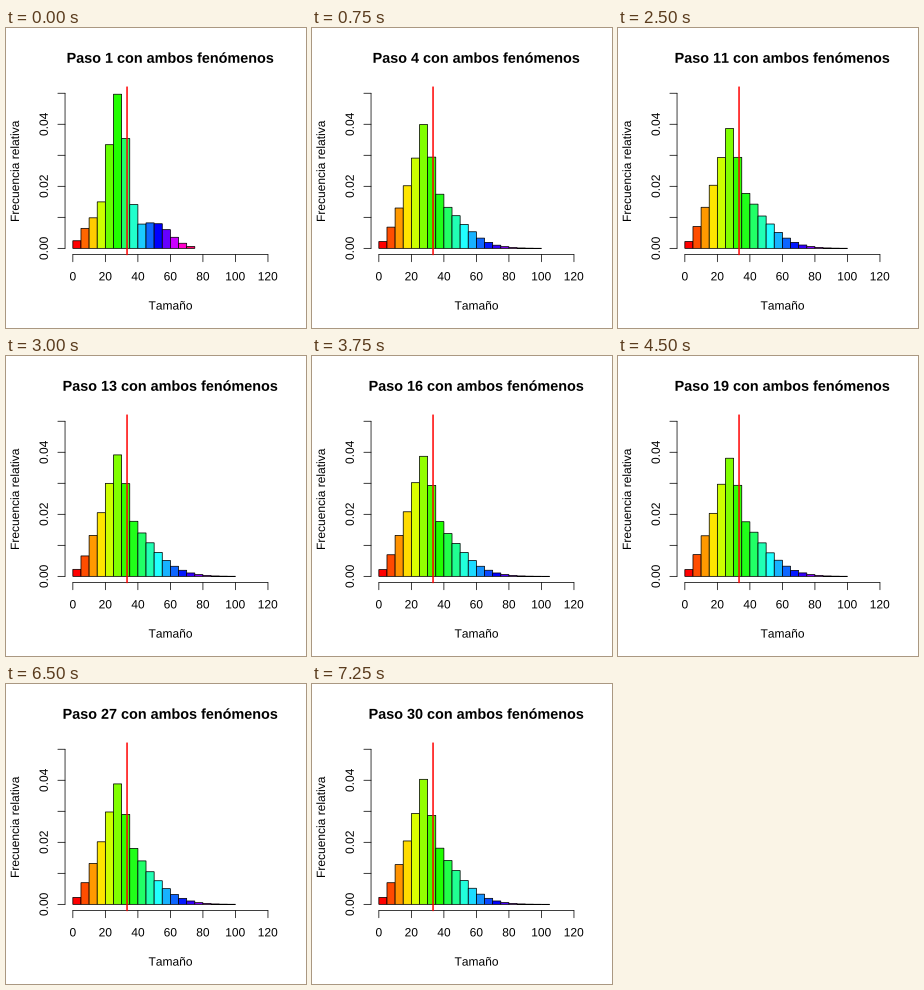
A matplotlib script that plays this animation: 300x300 px, repeating every 7500 ms.

```python
import colorsys

import matplotlib.pyplot as plt
import numpy as np
from matplotlib.animation import FuncAnimation
from matplotlib.patches import PathPatch, Rectangle
from matplotlib.textpath import TextPath
from matplotlib.transforms import Affine2D

plt.rcParams["text.kerning_factor"] = 6  # plain advances, no kerning

STEPS = 30
MAX_BINS = 21
PT = 0.72  # points per pixel at 100 dpi
LEFT, RIGHT, TOP, BOTTOM = 59.04, 269.76, 59.04, 226.56
MID_X, MID_Y = (LEFT + RIGHT) / 2, (TOP + BOTTOM) / 2
X_UNIT = (RIGHT - LEFT) / 1.08 / 120
Y_UNIT = (BOTTOM - TOP) / 1.08 / 0.05
X0 = LEFT + 4.8 * X_UNIT
Y0 = BOTTOM - 0.002 * Y_UNIT


def bump(i, height, centre, spread):
    return height * np.exp(-((i - centre) / spread) ** 2 / 2)


def start_shape(i):
    """Sharp main peak with a shoulder on either side."""
    return (bump(i, 0.0485, 5.05, 1.1) + bump(i, 0.0088, 2, 1.25)
            + bump(i, 0.0083, 9.4, 2))


def stable_shape(i):
    """Quadratic rise that switches over to a Gaussian fall."""
    rise = 0.0022 + 0.004 * i + 0.0007 * i**2
    j = i - 7
    fall = 0.0174 * np.exp(-0.18 * j - 0.031 * j**2)
    return fall + (rise - fall) / (1 + np.exp(4 * (i - 5.77)))


def histogram(step):
    mix = 1 - np.exp(-0.8 * (step - 1))
    drift = 0.7 * np.cos(np.pi * (step - 16) / 7)
    i = np.arange(round(15 + mix * (5 + drift)))
    noise = np.random.default_rng(step).normal(0, 0.015, MAX_BINS)
    heights = start_shape(i) * (1 - mix) + stable_shape(i) * mix
    return heights * (1 + mix * noise[:len(i)])


def rainbow(fraction):
    """Hue wheel whose greens carry a little red."""
    r, g, b = colorsys.hsv_to_rgb(fraction, 1, 1)
    return max(r, 0.13 * g), g, b


fig = plt.figure(figsize=(3, 3), dpi=100, facecolor="white")
ax = fig.add_axes([0, 0, 1, 1])
ax.set_xlim(0, 300)
ax.set_ylim(300, 0)
ax.axis("off")


def line(xs, ys, color="black", width=0.75):
    ax.plot(xs, ys, color=color, lw=width * PT, snap=False, zorder=3,
            solid_capstyle="round")


def text_path(x, y, text, size=12, weight="normal", upward=False):
    """Outline of a text centred on x, y along its baseline."""
    path = TextPath((0, 0), text, size=size,
                    prop={"family": "Liberation Sans", "weight": weight})
    box = path.get_extents()
    move = Affine2D().translate(-(box.x0 + box.x1) / 2, 0).scale(1, -1)
    if upward:
        move.rotate_deg(-90)
    return move.translate(x, y).transform_path(path)


def label(*args, **style):
    return ax.add_patch(PathPatch(text_path(*args, **style), fc="black",
                                  lw=0, snap=False, zorder=4))


bars = [ax.add_patch(Rectangle((X0 + 5 * i * X_UNIT, Y0), 5 * X_UNIT, 0,
                               ec="black", lw=0.75 * PT, snap=False, zorder=2))
        for i in range(MAX_BINS)]

line([X0, X0 + 120 * X_UNIT], [BOTTOM, BOTTOM])
for value in range(0, 121, 20):
    x = X0 + value * X_UNIT
    line([x, x], [BOTTOM, BOTTOM + 7.2])
    label(x, 252.4, str(value))

line([LEFT, LEFT], [Y0, Y0 - 0.05 * Y_UNIT])
for k in range(6):
    y = Y0 - k * 0.01 * Y_UNIT
    line([LEFT - 7.2, LEFT], [y, y])
    if k % 2 == 0:
        label(41.8, y, f"{k / 100:.2f}", upward=True)

line([X0 + 100 / 3 * X_UNIT] * 2, [TOP, BOTTOM], "red", 1.5)
label(MID_X, 281.6, "Tamaño")
label(13, MID_Y, "Frecuencia relativa", upward=True)
title = label(MID_X, 34.8, "Paso", size=14.4, weight="bold")


def update(frame):
    step = frame + 1
    title.set_path(text_path(MID_X, 34.8, f"Paso {step} con ambos fenómenos",
                             size=14.4, weight="bold"))
    heights = histogram(step)
    count = len(heights)
    for i, bar in enumerate(bars):
        bar.set_visible(i < count)
        if i < count:
            bar.set_height(-heights[i] * Y_UNIT)
            bar.set_facecolor(rainbow(i / count))
    return [title, *bars]


anim = FuncAnimation(fig, update, frames=STEPS, interval=250,
                     repeat=True, repeat_delay=0, blit=False)
plt.show()
```
